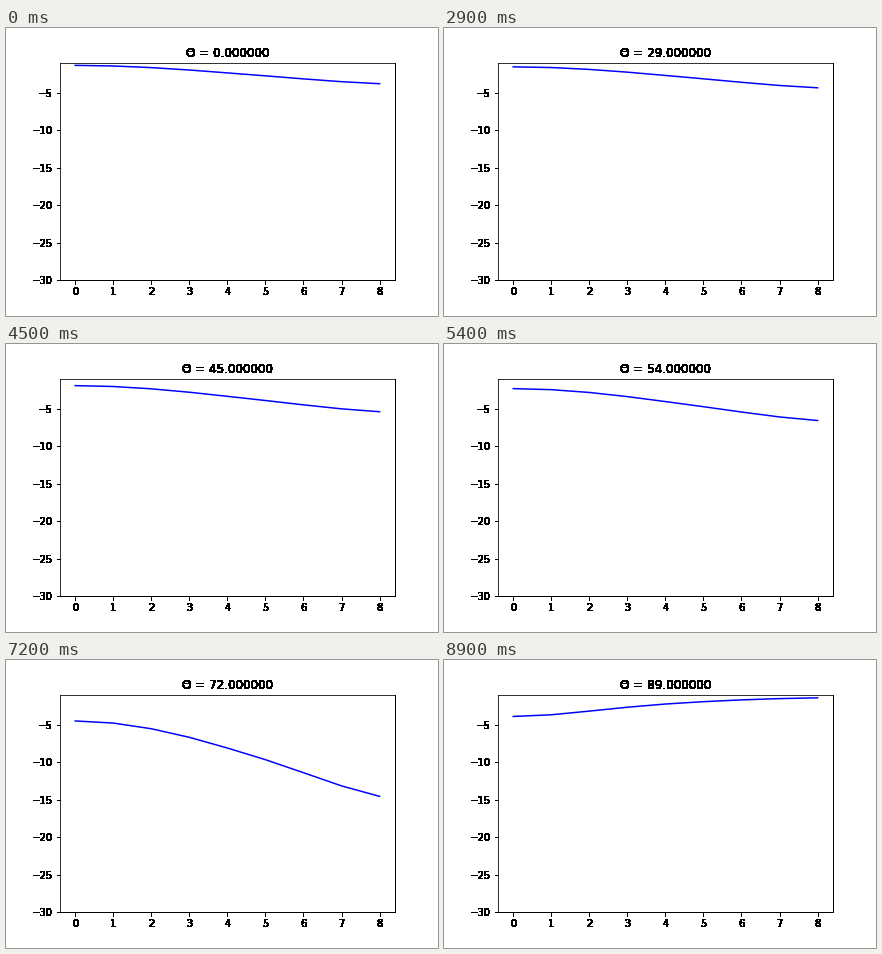
Write a matplotlib script that moves like this. It is 432 px wide and 288 px high and loops after 9 s.

```python
import numpy as np
import matplotlib.pyplot as plt
from matplotlib.animation import FuncAnimation

plt.rcParams.update({"font.family": "DejaVu Sans", "font.size": 10})

# relative permittivity of each sample
EPS = np.array([160.8, 143.2, 108.4, 76.5, 54.0, 39.95, 30.55, 24.6, 21.35])


def reflection_db(deg):
    """Fresnel reflection for parallel polarisation, in dB."""
    theta = np.radians(deg)
    a = EPS * np.cos(theta)
    b = np.sqrt(EPS - np.sin(theta) ** 2)
    return 20 * np.log10(np.abs((a - b) / (a + b)))


def harden(img, dpi):
    """Make every touched pixel fully opaque."""
    img = img.copy()
    img[..., 3] = img[..., 3] > 0
    return img, 0, 0


fig, ax = plt.subplots(figsize=(6, 4), dpi=72, facecolor="white")
fig.subplots_adjust(left=0.125, right=0.9, bottom=0.125, top=0.88)
ax.set_xlim(-0.4, 8.4)
ax.set_ylim(-30, -1)
ax.set_xticks(range(9))
ax.set_yticks(range(-30, 0, 5))

line, = ax.plot(np.arange(9), reflection_db(0), color="b", lw=1.5)
title = ax.set_title("Θ = %f" % 0, fontsize=12)

hard = [title, ax.spines["right"], ax.spines["bottom"]]
for axis in (ax.xaxis, ax.yaxis):
    hard += list(axis.get_ticklabels()) + list(axis.get_ticklines())
for artist in hard:
    artist.set_agg_filter(harden)


def update(deg):
    line.set_ydata(reflection_db(deg))
    title.set_text("Θ = %f" % deg)
    return line, title


anim = FuncAnimation(fig, update, frames=90, interval=100, repeat=True)
plt.show()
```
